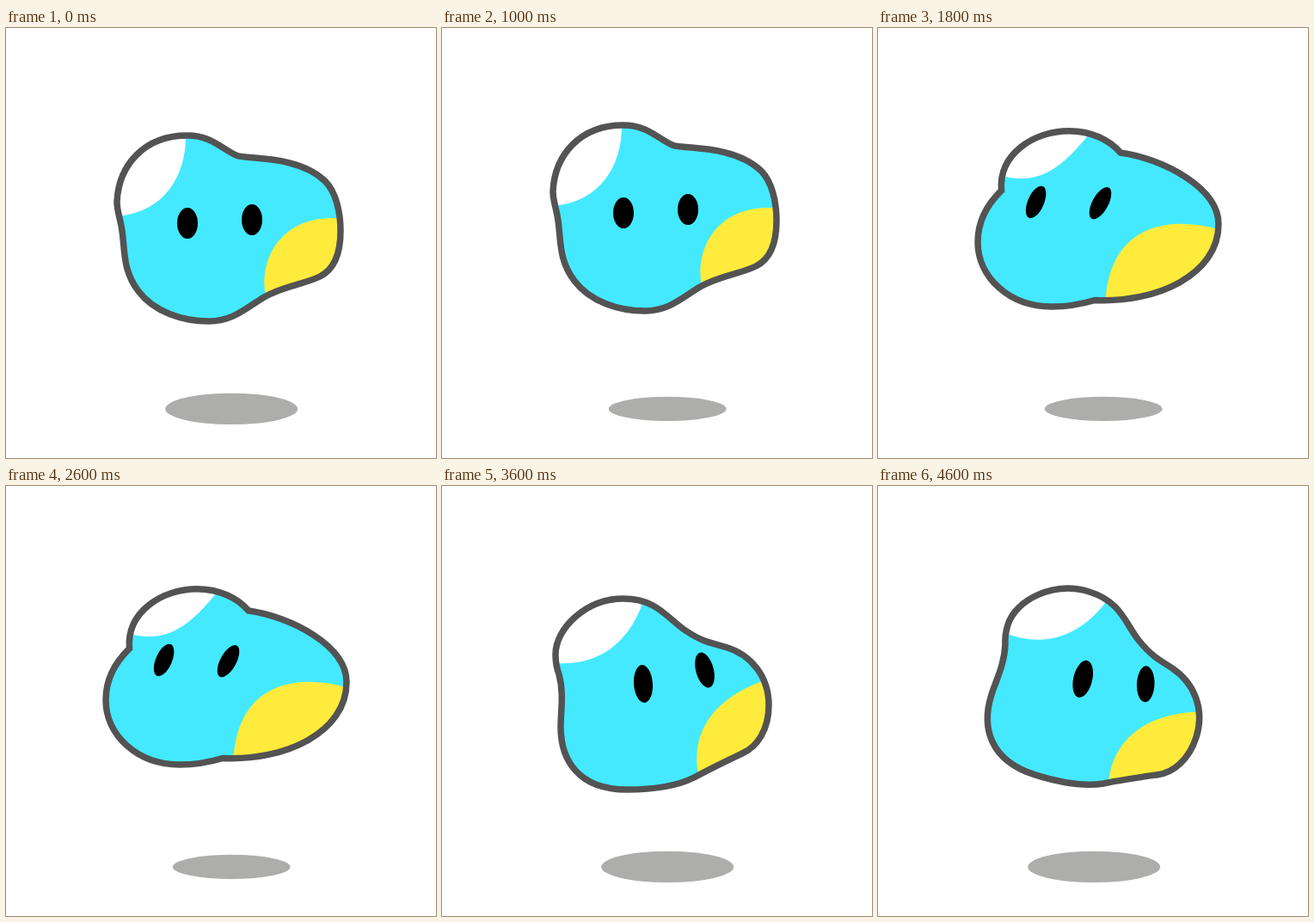
These frames come from a looping animation (500x500 px, 4800 ms). An HTML page:

```html
<!DOCTYPE html>
<html lang="en">
<head>
<meta charset="utf-8">
<title>Bouncing blob</title>
<style>
html, body { margin: 0; width: 100%; height: 100%; overflow: hidden; background: #fff; }
svg { display: block; width: 100vw; height: 100vh; }
</style>
</head>
<body>
<svg viewBox="0 0 500 500">
  <defs><clipPath id="clip"><path id="clipShape"/></clipPath></defs>
  <ellipse id="shadow" fill="#adadac"/>
  <g id="blob">
    <g clip-path="url(#clip)">
      <rect width="500" height="500" fill="#44e9ff"/>
      <path id="white" fill="#fff"/>
      <path id="yellow" fill="#ffeb3b"/>
    </g>
    <path id="outline" fill="none" stroke="#535353" stroke-width="7.5"/>
    <ellipse id="eye0"/>
    <ellipse id="eye1"/>
  </g>
</svg>
<script>
const STEP = 200, STEPS = 24;
const $ = id => document.getElementById(id);
const set = (id, attrs) => {
  for (const k in attrs) $(id).setAttribute(k, attrs[k]);
};

// Eyes: cx, cy, rx, ry, tilt
const poses = [
  {
    body: 'M211 125C240 125 252 142 269 148.5C283 153 340 148 371 178C384 191 389 215 389 236C389 260 383 280 365 289C344 299 325 299 300 313C280 325 264 341 236 341C205 341 172 330 154 306C134 280 139 255 134 230C131 215 129 211 129 202C131 160 160 125 211 125Z',
    white: 'M209 120C211 172 184 214 130 219L100 219V100H209Z',
    yellow: 'M304 318C290 278 315 212 395 222L400 330Z',
    eyes: [[211, 227, 12, 18, 0], [286, 223, 12, 18, 0]],
    lift: [0, -12, -26]
  },
  {
    body: 'M143.5 189C140 146 182 119.7 222 119.7C248 119.7 269 130 282 145C332 152 396 186 396 228C396 287 324 320 252 316.5C237 321 219 324 202 324C152 324 116 289 116 249C116 223 128 204 143.5 189Z',
    white: 'M140 171C192 186 218 157 250 118L250 100H140Z',
    yellow: 'M264 325C266 238 325 214 400 235V340H264Z',
    eyes: [[183.6, 202.4, 9.4, 20, 23.5], [258.5, 203.6, 9.3, 20.6, 28.5]],
    lift: [12, 0, -13]
  },
  {
    body: 'M211 131C250 131 262 154 283 168C301 180 310 182 329 187C360 196 380 222 380 255C380 284 366 303 350 310.5C330 320 313 328 293 339C269 351 240 353 215 353C158 353 138 318 138 280C138 262 142 241 136 219C133 211 132 206 132 196C132 165 168 131 211 131Z',
    white: 'M130 206C185 210 220 180 236 128V100H110V206Z',
    yellow: 'M299 340C285 280 325 240 385 223L400 340Z',
    eyes: [[234, 230, 11, 22, -4], [305.5, 214, 10.3, 21, -15]]
  }
];

const TILT = 17.3, SWAY = 11;
let shown = -1;

function draw(step) {
  const pose = poses[Math.floor(step / 8)];
  const beat = step % 4;
  set('clipShape', { d: pose.body });
  set('outline', { d: pose.body });
  set('white', { d: pose.white });
  set('yellow', { d: pose.yellow });
  pose.eyes.forEach(([cx, cy, rx, ry, a], i) =>
    set('eye' + i, { cx, cy, rx, ry, transform: `rotate(${a} ${cx} ${cy})` }));

  if (pose.lift) {
    const level = [0, 1, 2, 1][beat];
    set('blob', { transform: `translate(0 ${pose.lift[level]})` });
    set('shadow', { cx: 262.2, cy: 442.9, rx: 77 - 8.6 * level, ry: 18.2 - 4.1 * level });
  } else {
    const side = [0, 1, 0, -1][beat];
    set('blob', { transform: `rotate(${-TILT * side} 254.6 241)` });
    set('shadow', { cx: 262.2 + SWAY * side, cy: 442.9, rx: 77, ry: 18.2 });
  }
}

function tick() {
  const step = Math.floor(performance.now() / STEP) % STEPS;
  if (step !== shown) draw(shown = step);
  requestAnimationFrame(tick);
}
tick();
</script>
</body>
</html>
```
